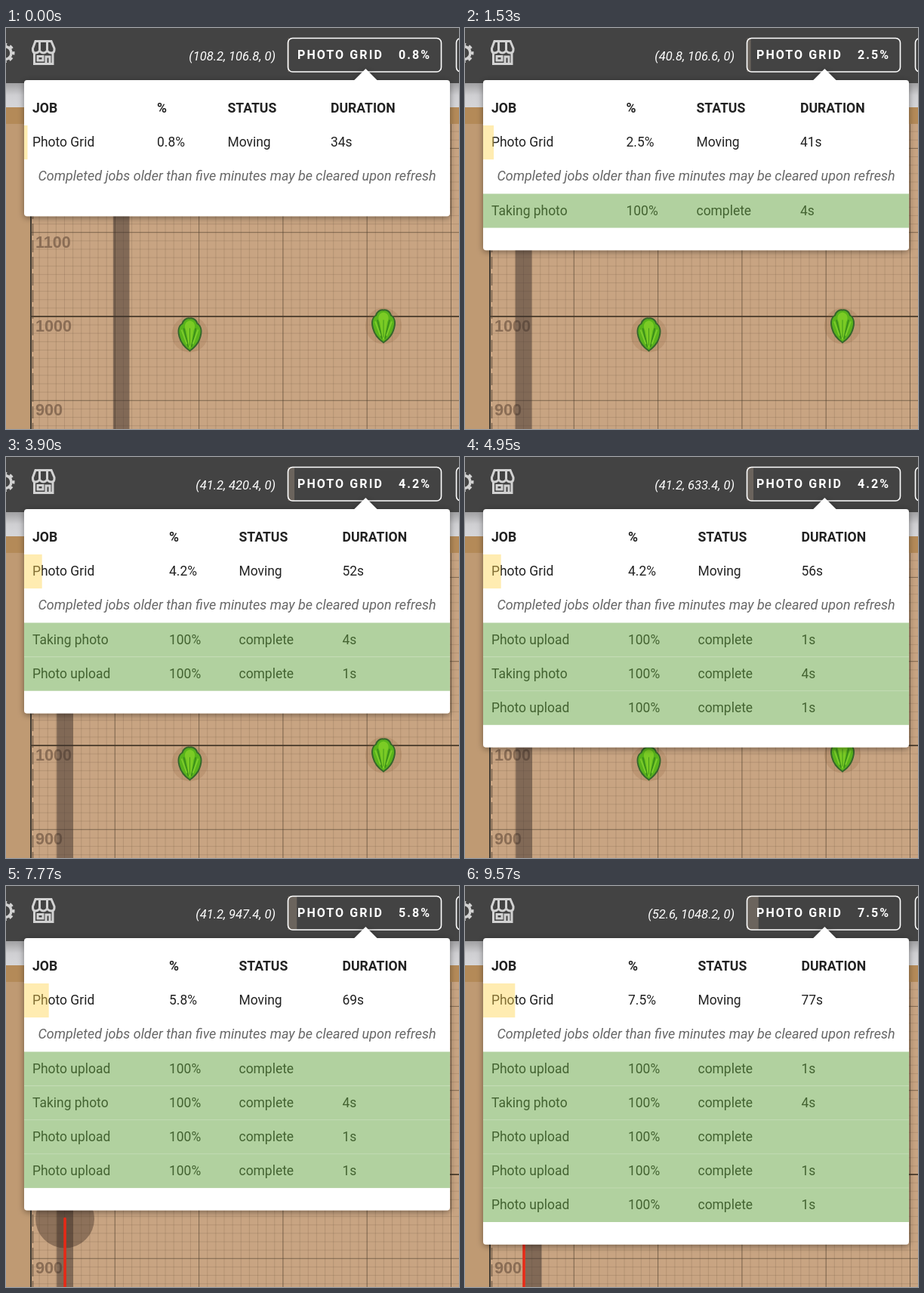
Write an HTML page that moves like this. It is 600 by 531 pixels and loops after 9.6 s.

```html
<!DOCTYPE html>
<html lang="en">
<head>
<meta charset="utf-8">
<title>Photo grid job</title>
<style>
html, body { margin: 0; width: 100%; height: 100%; overflow: hidden; background: #bf9a73; }
svg { display: block; width: 600px; height: 531px; font: 17.45px Roboto, sans-serif; }
.axis { font: bold 21.6px "Liberation Sans", Arial, sans-serif; fill: #8a6d55; }
.badge { font-size: 16px; font-weight: 700; letter-spacing: 2.1px; fill: #fff; }
.head { font-size: 17.6px; font-weight: 700; fill: #222; }
.note { font-size: 17.97px; font-style: italic; fill: #666; text-anchor: middle; }
.coords { font-size: 16.55px; font-style: italic; fill: #fff; text-anchor: end; }
</style>
</head>
<body>
<svg viewBox="0 0 600 531">
  <defs>
    <linearGradient id="shade" x2="0" y2="1">
      <stop stop-color="#a0a0a2"/><stop offset=".5" stop-color="#cfcfd2"/><stop offset="1" stop-color="#d6d6d9"/>
    </linearGradient>
    <filter id="shadow" x="-10%" y="-10%" width="120%" height="125%">
      <feDropShadow dx="0" dy="2" stdDeviation="4.5" flood-opacity=".42"/>
    </filter>
    <g id="plant">
      <circle r="24" fill="#8a6038" opacity=".2"/>
      <path d="M0 -21C5 -22 9 -18 10 -14C15 -11 16 -4 14 3C12 11 6 18 0 22C-6 18 -12 11 -14 3C-16 -4 -15 -11 -10 -14C-9 -18 -5 -22 0 -21Z" fill="#58b31b" stroke="#35662b" stroke-width="2"/>
      <path d="M0 -18C7 -17 8 -10 5 -5L1 18H-1L-5 -5C-8 -10 -7 -17 0 -18Z" fill="#7bcb25"/>
      <path d="M-8 -8L-2 17M8 -8L2 17" fill="none" stroke="#3a8a1a" stroke-width="1.6"/>
      <path d="M-11 -6L-4 13M11 -6L4 13" fill="none" stroke="#7ccb2c" stroke-width="2"/>
      <path d="M0 -8V15" stroke="#459a1a"/>
    </g>
  </defs>
  <rect y="127" x="33" width="567" height="404" fill="#c8a482"/>
  <path id="minor" stroke="#634a35" stroke-opacity=".19"/>
  <path id="major" stroke="#4b3c2c" stroke-opacity=".5"/>
  <path d="M33 382H600" stroke="#3f3223" stroke-width="2" opacity=".75"/>
  <path d="M33 127V531" stroke="#433c33" stroke-width="2"/>
  <path d="M35.5 127V531" stroke="#59493a" stroke-width="1.5" stroke-dasharray="16 6" opacity=".7"/>
  <g class="axis"><text x="39" y="290.7">1100</text><text x="39" y="402">1000</text><text x="39" y="513.3">900</text></g>
  <use href="#plant" x="243.5" y="405.5"/>
  <use href="#plant" x="500" y="394.5"/>
  <g id="bot"></g>
  <rect y="105" width="600" height="22" fill="#b48a58"/>
  <rect y="73" width="600" height="32" fill="url(#shade)"/>
  <rect width="600" height="73" fill="#434343"/>
  <g fill="none" stroke="#d2d2d2" stroke-width="3.5">
    <circle cx="-1.500" cy="33" r="8.500"/>
    <circle cx="-1.500" cy="33" r="11" stroke-width="4" stroke-dasharray="4.600 4.040" stroke-dashoffset="2.300"/>
    <path stroke-width="3" d="M39 17.500H60L64 27V29Q64 33 60 33Q56.500 33 54.500 30Q52.500 33 49.500 33Q46.500 33 44.500 30Q42.500 33 39 33Q35.500 33 35.500 29V27ZM37.500 33V47.500H62V33M44.500 18V29M54.500 18V29M42 37.500H49V43H42ZM53 48V38H58V48"/>
  </g>
  <rect x="596.5" y="13.5" width="60" height="44.5" rx="6" fill="none" stroke="#fff" stroke-width="1.6"/>
  <g id="bar"></g>
  <g id="panel"></g>
</svg>
<script>
const LOOP = 9600, TICK = 30, RATE = 4.5 / 1000, ROW = 45.1, UNIT = 1.113;
const photos = [[440, 1500], [2950, 3900], [5410, 6660], [8240, 9400]];
const uploads = [[1800, '1s'], [4200, '1s'], [6960, ''], [9480, '1s']];
const percents = [0.8, 1.7, 2.5, 3.3, 4.2, 5, 5.8, 6.7, 7.5];
const xPath = [[120, 108.2], [430, 40.8], [1540, 40.8], [1620, 41.2], [9520, 41.2], [9570, 52.6], [9600, 59.3]];
const yPath = [[120, 106.8], [430, 106.6], [1530, 106.6], [2880, 407], [2940, 420.4], [3990, 420.4], [4950, 633.4],
  [5400, 734.6], [6810, 734.6], [7770, 947.4], [8225, 1048.2]];
const el = id => document.getElementById(id);
const tenth = v => Math.round(v * 10) / 10;
const px = x => 32.2 + x * UNIT;
const py = y => 382 + (1000 - y) * UNIT;

function at(path, t) {
  const i = path.findIndex(p => p[0] > t);
  if (i < 0) return path[path.length - 1][1];
  if (!i) return path[0][1];
  const [t0, a] = path[i - 1], [t1, b] = path[i];
  return a + (b - a) * (t - t0) / (t1 - t0);
}

function grid(step, id) {
  let d = '';
  for (let x = 33; x < 600; x += step) d += `M${x} 127V531`;
  for (let k = -Math.floor(254 / step); k * step < 150; k++) d += `M33 ${382 + k * step}H600`;
  el(id).setAttribute('d', d);
}

const text = (x, y, s, cls = '') => `<text x="${x}" y="${y}" class="${cls}">${s}</text>`;
const rect = (x, y, w, h, fill) => `<rect x="${x}" y="${y}" width="${w}" height="${h}" fill="${fill}"/>`;

function drawBot(x, y) {
  const cx = px(x), cy = py(y), trail = px(41.2);
  el('bot').innerHTML = rect(cx - 10.8, 127, 21.6, 404, 'rgba(60,48,45,.5)')
    + `<circle cx="${cx}" cy="${cy}" r="39" fill="rgba(60,45,35,.42)"/>`
    + (cy < 531 ? `<path d="M${trail} 531V${cy}H${cx}" fill="none" stroke="#e62a17" stroke-width="3.6" stroke-linecap="round"/>` : '');
}

function drawBar(x, y, pct) {
  const left = pct === 5 ? 390.5 : 373.5, w = 576.5 - left;
  el('bar').innerHTML = text(left - 16.3, 43, `(${tenth(x)}, ${tenth(y)}, 0)`, 'coords')
    + rect(left, 13.5, w * pct / 100, 44.5, '#6b645d')
    + `<rect x="${left}" y="13.5" width="${w}" height="44.5" rx="6" fill="none" stroke="#fff" stroke-width="1.6"/>`
    + text(left + 12.5, 41.3, 'PHOTO GRID', 'badge')
    + text(pct === 5 ? 538 : 520, 41.3, pct + '%', 'badge');
  return left + w / 2 + 1.4;
}

function drawPanel(t, pct, tip) {
  const working = photos.find(([a, b]) => t >= a && t < b);
  const taken = photos.filter(p => t >= p[1]).length;
  const done = uploads.filter(u => t >= u[0]).map(u => ['Photo upload', '100%', 'complete', u[1]]).reverse();
  const cols = done.length ? (working ? [35, 204, 290, 455.5] : [35, 216, 308.5, 445.5])
    : working ? [35, 204, 284, 453] : taken ? [35, 213.5, 306.5, 444] : [35, 200, 293.5, 430];
  if (taken && !working) done.splice(done.length === taken ? 1 : 0, 0, ['Taking photo', '100%', 'complete', '4s']);
  const active = [['Photo Grid', pct + '%', working ? 'Taking photo' : 'Moving', Math.round(34 + t * RATE) + 's']];
  if (working) active.push(['Taking photo', '50%', 'working', Math.round((t - working[0]) * RATE) + 's']);

  const line = (cells, y, cls) => cells.map((s, i) => text(cols[i], y, s, cls)).join('');
  const height = 180.2 + ROW * (active.length - 1 + done.length);
  let y = 129;
  let out = `<g filter="url(#shadow)"><path d="M${tip - 16} 70L${tip} 54L${tip + 16} 70Z" fill="#fff"/>`
    + `<rect x="24" y="69" width="564" height="${height}" rx="4" fill="#fff"/></g>`
    + line(['JOB', '%', 'STATUS', 'DURATION'], 111.7, 'head');
  for (const cells of active) {
    out += `<g fill="#222">${line(cells, y + 28.3)}</g>`
      + rect(24, y, 5.64 * parseFloat(cells[1]), ROW, 'rgba(255,211,76,.43)');
    y += ROW;
  }
  out += text(306, y + 28.3, 'Completed jobs older than five minutes may be cleared upon refresh', 'note');
  y += ROW + .3;
  done.forEach((cells, i) => {
    out += `<g fill="#222">${line(cells, y + 28.3)}</g>` + rect(24, y, 564, ROW, 'rgba(101,163,65,.5)');
    if (i) out += rect(24, y - .5, 564, 1, 'rgba(255,255,255,.15)');
    y += ROW;
  });
  el('panel').innerHTML = out;
}

function frame() {
  const t = Math.floor(performance.now() % LOOP / TICK) * TICK;
  const x = at(xPath, t), y = at(yPath, t);
  const pct = percents[photos.flat().filter(p => t >= p).length];
  drawBot(x, y);
  drawPanel(t, pct, drawBar(x, y, pct));
  requestAnimationFrame(frame);
}

grid(11.13, 'minor');
grid(111.3, 'major');
frame();
</script>
</body>
</html>
```
